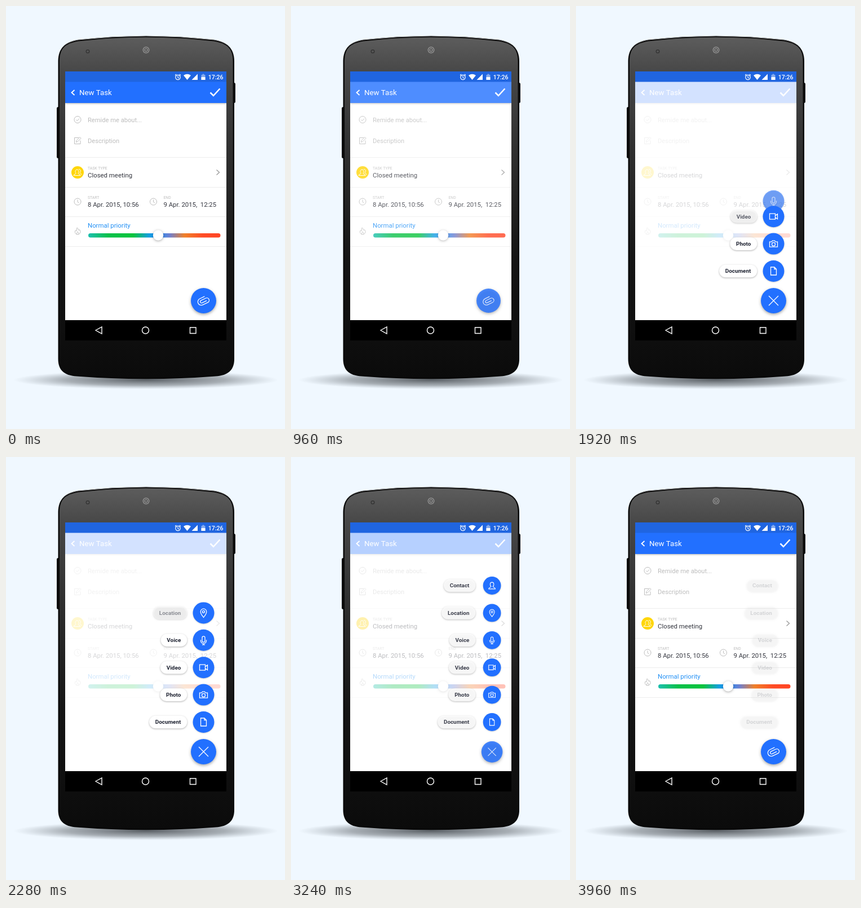
Write an HTML page with a canvas that moves like this. It is 495x750 px and loops after 4800 ms.

```html
<!DOCTYPE html>
<html lang="en">
<head>
<meta charset="utf-8">
<title>New Task</title>
<style>
html, body { margin: 0; width: 100%; height: 100%; overflow: hidden; background: #f0f8ff; }
canvas { display: block; }
</style>
</head>
<body>
<canvas id="stage" width="495" height="750"></canvas>
<script>
const ctx = document.getElementById('stage').getContext('2d');
const LOOP = 4800, STEP = 120;
const BLUE = '#2270ff', GREY = '#bdbdbd', INK = '#34363f';
const FAB = { x: 350.5, y: 522.5, r: 22.5 };
const SLIDE = 37.5;

const icons = {
  clip: 'M5 2.3H-4A2.3 2.3 0 0 1-4-2.3H5.5A4.2 4.2 0 0 1 5.5 6.1H-4.5A6.1 6.1 0 0 1-4.5-6.1H5',
  cross: 'M-8.5-8.5L8.5 8.5M8.5-8.5L-8.5 8.5',
  document: 'M-5-7H1.5L5-3.5V7H-5ZM1.5-7V-3.5H5',
  photo: 'M-7-3.5H-3.5L-2-5.5H2L3.5-3.5H7V5.5H-7ZM3 .8A3 3 0 1 1-3 .8A3 3 0 1 1 3 .8',
  video: 'M-7-5H3V5H-7ZM3-1.5L7-4.5V4.5L3 1.5',
  voice: 'M-2.5-4.5A2.5 2.5 0 0 1 2.5-4.5V1A2.5 2.5 0 0 1-2.5 1ZM-5-.5V1A5 5 0 0 0 5 1V-.5M0 6V8M-2.5 8H2.5',
  location: 'M0 8C-3 4-5.3 1.5-5.3-2A5.3 5.3 0 0 1 5.3-2C5.3 1.5 3 4 0 8ZM2-2A2 2 0 1 1-2-2A2 2 0 1 1 2-2',
  contact: 'M-2 2C-5-1-4.5-7 0-7S5-1 2 2C2 4 7 3.5 7 7H-7C-7 3.5-2 4-2 2Z',
  check: 'M6 0A6 6 0 1 1-6 0A6 6 0 1 1 6 0M-2.7 0L-.7 2.2L3-2',
  edit: 'M2-5H-5.5V6H5V0M-2.5 3L-2 0L4-6L6-4L0 2Z',
  clock: 'M6 0A6 6 0 1 1-6 0A6 6 0 1 1 6 0M0-3.5V.5L2.5 2',
  flame: 'M-1-6C2-4 1-2 2.5-1L3.5-2.5C7 2 4 6 0 6S-6 2-3.5-1.5L-2 0C-1-2-2-4-1-6ZM-1.5 6C-2.5 3 0 3 0 1C2 3 2.5 4 1.5 6',
  group: 'M-3 1.5C-5-1-4-5-1-5S3-1 1 1.5C1 3.5 5 3 5 5.5H-7C-7 3-3 3.5-3 1.5ZM2-5.5C6-6 6-1 4 .5C4 2 7 2 7 4',
  chevron: 'M-2.5-4.5L2.5 0L-2.5 4.5',
  alarm: 'M4.2.5A4.2 4.2 0 1 1-4.2.5A4.2 4.2 0 1 1 4.2.5M0-2V1L2 2M-5-3L-2.8-5M5-3L2.8-5'
};
for (const name in icons) icons[name] = new Path2D(icons[name]);

const items = ['Document', 'Photo', 'Video', 'Voice', 'Location', 'Contact']
  .map((label, i) => ({ label, icon: icons[label.toLowerCase()], y: 470 - 48.4 * i, start: 1320 + 200 * i }));

const clamp = v => Math.max(0, Math.min(1, v));

function rect(x, y, w, h, color) {
  ctx.fillStyle = color;
  ctx.fillRect(x, y, w, h);
}

function disc(x, y, r, color) {
  ctx.fillStyle = color;
  ctx.beginPath();
  ctx.arc(x, y, r, 0, 7);
  ctx.fill();
}

function pill(x, y, w, h, color) {
  ctx.fillStyle = color;
  ctx.beginPath();
  ctx.roundRect(x, y, w, h, h / 2);
  ctx.fill();
}

function text(str, x, y, size, color, weight = 400) {
  ctx.font = `${weight} ${size}px Roboto, sans-serif`;
  ctx.fillStyle = color;
  ctx.fillText(str, x, y);
}

function icon(path, x, y, color, width = 1, angle = 0) {
  ctx.save();
  ctx.translate(x, y);
  ctx.rotate(angle);
  ctx.strokeStyle = color;
  ctx.lineWidth = width;
  ctx.stroke(path);
  ctx.restore();
}

function shadowed(color, blur, dy, draw) {
  ctx.save();
  ctx.shadowColor = color;
  ctx.shadowBlur = blur;
  ctx.shadowOffsetY = dy;
  draw();
  ctx.restore();
}

function gradient(x0, y0, x1, y1, stops) {
  const g = ctx.createLinearGradient(x0, y0, x1, y1);
  stops.forEach(([at, color]) => g.addColorStop(at, color));
  return g;
}

function phonePath(d) {
  const l = 92.5 + d, r = 405 - d;
  ctx.beginPath();
  ctx.moveTo(l, 98);
  ctx.bezierCurveTo(l, 74, 106, 64 + d, 128, 60 + d);
  ctx.quadraticCurveTo(248.5, 46 + d, 369, 60 + d);
  ctx.bezierCurveTo(391, 64 + d, r, 74, r, 98);
  ctx.lineTo(r, 626);
  ctx.bezierCurveTo(r, 648, 391, 655 - d, 372, 656.5 - d);
  ctx.quadraticCurveTo(248.5, 666 - d, 125, 656.5 - d);
  ctx.bezierCurveTo(106, 655 - d, l, 648, l, 626);
  ctx.closePath();
}

function drawPhone() {
  rect(0, 0, 495, 750, '#f0f8ff');
  ctx.save();
  ctx.translate(248, 663);
  ctx.scale(1, 0.07);
  const floor = ctx.createRadialGradient(0, 0, 0, 0, 0, 235);
  floor.addColorStop(0, 'rgba(40,45,50,.75)');
  floor.addColorStop(0.6, 'rgba(60,65,70,.4)');
  floor.addColorStop(1, 'rgba(100,110,120,0)');
  disc(0, 0, 235, floor);
  ctx.restore();

  pill(90, 179, 5, 91, '#111');
  pill(402, 136, 5, 36, '#111');
  phonePath(0);
  ctx.fillStyle = '#080808';
  ctx.fill();
  ctx.strokeStyle = gradient(0, 52, 0, 76, [[0, '#c4c6c8'], [0.5, '#777'], [1, 'rgba(0,0,0,0)']]);
  ctx.lineWidth = 1;
  ctx.stroke();
  phonePath(2.5);
  ctx.fillStyle = gradient(0, 54, 0, 660,
    [[0, '#5d5d5d'], [0.1, '#484848'], [0.33, '#303030'], [0.65, '#151515'], [1, '#0b0b0b']]);
  ctx.fill();

  disc(145, 80.5, 3.5, '#363636');
  disc(145, 80.5, 2, '#565656');
  disc(248.5, 78, 6, '#909090');
  disc(248.5, 78, 4.5, '#5b5b5b');
  disc(248.5, 78, 2.8, '#999');
  disc(248.5, 78, 1.4, '#333');
}

function drawStatusBar() {
  rect(105, 116, 286, 18.5, '#2065e0');
  icon(icons.alarm, 305, 126, '#fff', 1.2);
  ctx.fillStyle = '#fff';
  ctx.fill(new Path2D('M315 123Q321.500 118.500 328 123L321.500 131ZM329.500 131L340 120.500V131Z'));
  rect(346.5, 122, 7, 9, 'rgba(255,255,255,.45)');
  rect(348.5, 120.5, 3, 1.5, 'rgba(255,255,255,.45)');
  rect(346.5, 126, 7, 5, '#fff');
  text('17:26', 358.7, 130, 10.6, '#fff', 500);
}

function drawNavBar() {
  rect(105, 557, 286, 36, '#000');
  icon(new Path2D('M159 575L170 569V581ZM253.500 575A6 6 0 1 1 241.500 575A6 6 0 1 1 253.500 575M326.500 570H337V580.500H326.500Z'),
    0, 0, '#fff', 1.4);
}

function drawForm() {
  rect(105, 134, 286, 423, '#fff');
  shadowed('rgba(0,0,0,.3)', 3, 1, () => rect(105, 134, 286, 38, BLUE));
  [268, 321, 373, 426].forEach(y => rect(105, y, 286, 1, '#ededed'));

  icon(icons.check, 127, 201.5, GREY);
  text('Remide me about...', 145, 205.5, 11.15, GREY);
  icon(icons.edit, 127, 238.5, GREY);
  text('Description', 145, 242.5, 11.1, GREY);

  disc(127, 295, 11, '#ffd60a');
  icon(icons.group, 127, 295, '#fff');
  text('TASK TYPE', 145, 289.5, 6.8, GREY);
  text('Closed meeting', 145, 303.5, 11.4, INK);
  icon(icons.chevron, 376, 295, '#999', 1.3);

  icon(icons.clock, 127, 347, GREY);
  text('START', 145, 341.5, 6.8, GREY);
  text('8 Apr. 2015, 10:56', 145, 356, 11.35, INK);
  icon(icons.clock, 261.5, 347, GREY);
  text('END', 279.5, 341.5, 6.8, GREY);
  text('9 Apr. 2015,\u00a0 12:25', 279.5, 356, 11.35, INK);

  icon(icons.flame, 127, 399, GREY);
  text('Normal priority', 145, 393, 11.4, '#2290f5');
  pill(146, 403, 234.5, 7.5, gradient(146, 0, 380, 0, [
    [0, '#1bbfae'], [0.15, '#0cc04a'], [0.34, '#0cc43c'], [0.46, '#149fe0'],
    [0.53, '#1e90ff'], [0.62, '#727fcb'], [0.73, '#f08028'], [0.87, '#ff4b25'], [1, '#ff4525']]));
  shadowed('rgba(0,0,0,.35)', 4, 1, () => disc(270, 406.5, 9.2, '#fff'));
}

function drawHeaderText() {
  icon(icons.chevron, 119, 153.5, '#fff', 1.8, Math.PI);
  text('New Task', 130, 157.5, 13.3, '#fff');
  icon(new Path2D('M362.500 153.500L368 159L379.500 146.500'), 0, 0, '#fff', 2.5);
}

function drawButton(path, x, y, r, scale, alpha, angle = 0) {
  if (scale <= 0 || alpha <= 0) return;
  ctx.save();
  ctx.globalAlpha = alpha;
  ctx.translate(x, y);
  ctx.scale(scale, scale);
  const big = r > 20;
  shadowed(big ? 'rgba(0,0,0,.35)' : 'rgba(0,0,0,.18)', big ? 5 : 2, big ? 2 : 1, () => disc(0, 0, r, BLUE));
  icon(path, 0, 0, '#fff', 1.3, angle);
  ctx.restore();
}

function drawLabel(label, y, dx, alpha) {
  if (alpha <= 0) return;
  ctx.save();
  ctx.globalAlpha = alpha;
  ctx.font = '700 9.9px Roboto, sans-serif';
  const w = ctx.measureText(label).width, left = 310.3 - w + dx;
  shadowed('rgba(0,0,0,.3)', 3, 1, () => pill(left - 10.7, y - 11.3, w + 21.7, 22.6, '#fff'));
  text(label, left, y + 3.3, 9.9, '#1d2130', 700);
  ctx.restore();
}

function drawMenu(t, close) {
  const dx = SLIDE * close;
  items.forEach(({ label, y, start }) =>
    drawLabel(label, y, dx, clamp((t - start - 80) / 170) * (1 - 0.85 * close)));
  // Later items emerge from behind earlier ones.
  [...items].reverse().forEach(({ icon: path, y, start }) => {
    const phase = t - start;
    if (phase < 0) return;
    const rest = 1 - clamp(phase / 80);
    drawButton(path, FAB.x + dx, y + 21 * rest ** 1.4, 19, 1 - close, 1 - 0.4 * rest);
  });
}

function drawFab(t, open, close) {
  const clipAngle = -0.45;
  if (t < 1200) drawButton(icons.clip, FAB.x, FAB.y, FAB.r, 1 - 0.18 * open, 1 - 0.8 * open, clipAngle);
  const shown = clamp((t - 960) / 200);
  drawButton(icons.cross, FAB.x + SLIDE * close, FAB.y + 2 * close, FAB.r,
    (0.85 + 0.15 * shown) * (1 - close), shown * (1 - close));
  const back = 1 - (1 - clamp((t - 3480) / 480)) ** 2;
  drawButton(icons.clip, FAB.x, FAB.y, FAB.r, back, back, clipAngle);
}

function draw(t) {
  const open = clamp((t - 600) / 600) ** 2.7;
  const close = clamp((t - 2880) / 960) ** 1.85;
  drawPhone();
  ctx.save();
  ctx.beginPath();
  ctx.rect(105, 116, 286, 477);
  ctx.clip();
  drawForm();
  rect(105, 134, 286, 423, `rgba(255,255,255,${0.8 * open * (1 - close)})`);
  drawHeaderText();
  drawMenu(t, close);
  drawFab(t, open, close);
  drawStatusBar();
  drawNavBar();
  ctx.restore();
}

const begin = performance.now();
function tick() {
  const t = (performance.now() - begin) % LOOP;
  draw(Math.floor(t / STEP) * STEP);
  requestAnimationFrame(tick);
}
tick();
</script>
</body>
</html>
```
